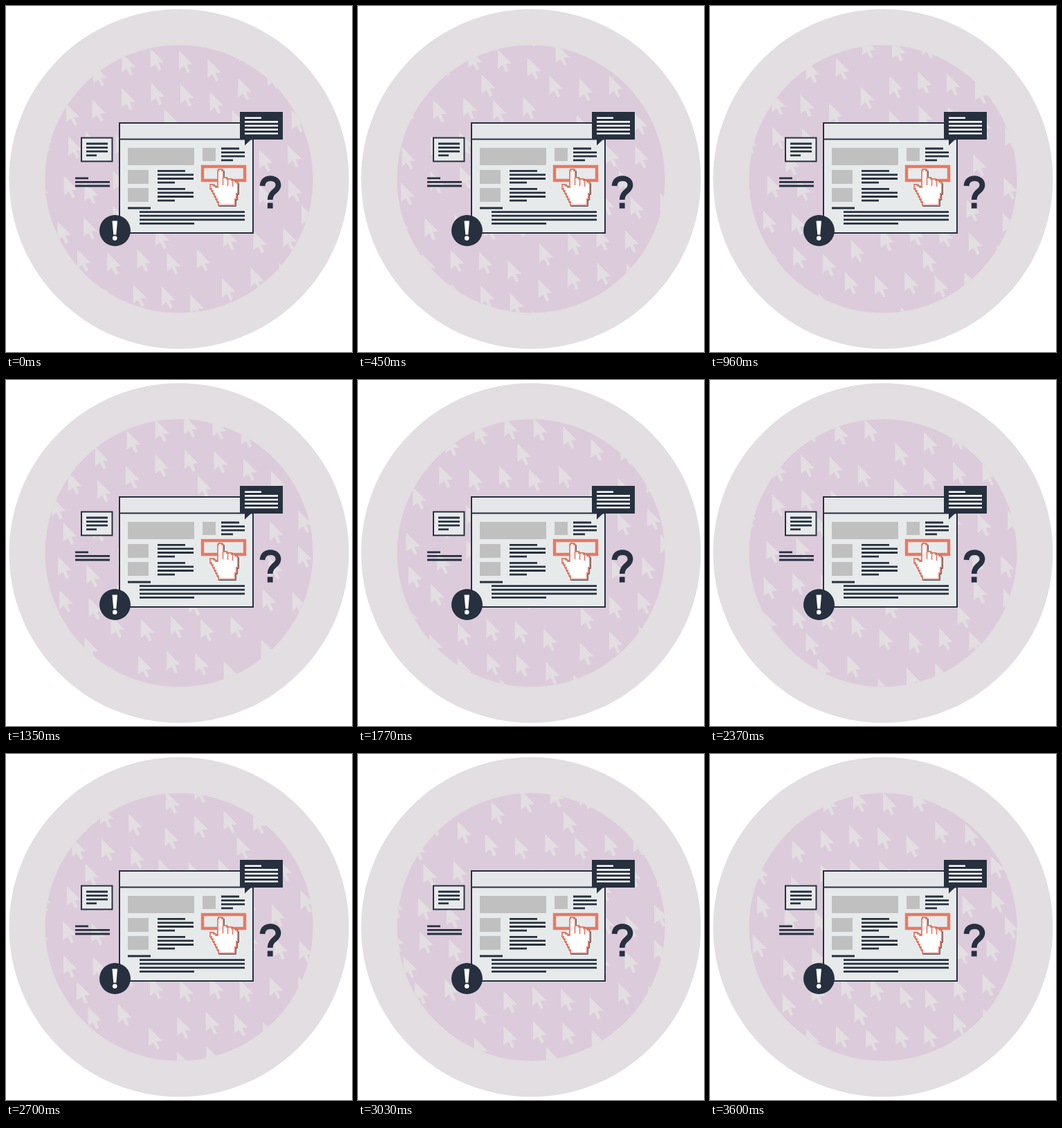
These frames come from a looping animation (500 by 500 pixels, 3.63 s). An HTML page:

```html
<!DOCTYPE html>
<html lang="en">
<head>
<meta charset="utf-8">
<title>Drifting cursors</title>
<style>
  html, body { margin: 0; width: 100%; height: 100%; overflow: hidden; background: #fff; }
  svg { display: block; width: 100vw; height: 100vh; }
</style>
</head>
<body>
<svg viewBox="0 0 500 500">
  <defs>
    <clipPath id="disc"><circle cx="250" cy="250" r="193.5"/></clipPath>
    <path id="hand" d="M307 236H312V238H314V248H319V250H326V252H331V254H334V256H335V271H333V279H331V288H307V283H305V279H303V275H301V271H299V267H297V264H295V258H300V260H303V262H306V238H307Z"/>
  </defs>
  <circle cx="250" cy="250" r="245.5" fill="#e2dee1"/>
  <circle cx="250" cy="250" r="193.5" fill="#dccbdb"/>
  <g clip-path="url(#disc)"><path id="arrows" fill="#e2dee1"/></g>

  <!-- browser window -->
  <rect x="164" y="169" width="193" height="159" fill="#e7eaeb" stroke="#26303f" stroke-width="2"/>
  <rect x="165" y="170" width="191" height="22" fill="#e5e6e9"/>
  <path d="M164 192.500H357" stroke="#26303f" stroke-width="2"/>
  <path d="M176 205h96v25h-96zM284 205h19v19h-19zM176 237h30v20h-30zM176 263h30v20h-30z" fill="#c0c0c1"/>

  <!-- note card, speech bubble, text strokes -->
  <rect x="109" y="190.500" width="44.500" height="34" fill="#e7eaeb" stroke="#26303f" stroke-width="2"/>
  <path d="M338 153H400V193H354L345 201.500V193H338Z" fill="#26303f"/>
  <path id="dark" stroke="#26303f" stroke-width="2.800"/>
  <path id="light" stroke="#fff" stroke-width="2.600"/>

  <!-- button and hand -->
  <rect x="284" y="232" width="61" height="20" fill="#e7eaeb" stroke="#ea7862" stroke-width="4.400"/>
  <use href="#hand" x="1" y="1" fill="#26303f" stroke="#26303f" stroke-width="1.400"/>
  <use href="#hand" fill="#fff" stroke="#ea7862" stroke-width="1.800"/>
  <path d="M313.500 248V259M320.500 251V260M327.500 253V261" stroke="#ea7862" stroke-width="1.700"/>

  <!-- exclamation and question signs -->
  <circle cx="157.500" cy="324.500" r="22.500" fill="#26303f"/>
  <path d="M153.500 310.500H161L159.300 330.500H155.300Z" fill="#fff"/>
  <circle cx="157.300" cy="335.600" r="3.300" fill="#fff"/>
  <path d="M370.500 260C371 252.500 376 249.200 382 249.200C388.500 249.200 393.500 253 393.500 259C393.500 268 381.700 267.500 381.700 280" fill="none" stroke="#26303f" stroke-width="7.800"/>
  <rect x="377.800" y="284.500" width="7.800" height="8" fill="#26303f"/>
</svg>
<script>
  const LOOP = 3630, STEP = 30, SPEED = 1 / 9;
  const $ = id => document.getElementById(id);

  // a paragraph of strokes; the first and last may be shorter
  function lines(x, y, count, width, first = width, last = width) {
    let d = "";
    for (let i = 0; i < count; i++) {
      const w = i === 0 ? first : i === count - 1 ? last : width;
      d += `M${x} ${y + i * 5.6}h${w}`;
    }
    return d;
  }
  $("dark").setAttribute("d",
    lines(311, 206, 4, 34, 26, 17) +
    lines(219, 238.3, 4, 52, 40, 25) +
    lines(219, 264.3, 4, 52, 40, 25) +
    lines(176, 292, 1, 33) +
    lines(193, 297.6, 4, 152, 152, 79) +
    lines(116, 199, 4, 31, 31, 15) +
    lines(100, 248.8, 3, 50, 19));
  $("light").setAttribute("d", lines(345, 161.8, 5, 48, 24));

  // three bands of five cursors, two of them sagging, plus a stray one
  function cluster(x, y) {
    const at = (dx, dy) => `M${x + dx} ${y + dy}v28l7-5.500 5 10 4-2-4.500-10 8.500-.5z`;
    let d = at(113, -33);
    for (let i = 0; i < 5; i++) {
      d += at(43.2 * i, i % 2 * 4.5 - 0.5);
      d += at(41.3 * i - 2, 50 + 4.6 * (i - 2.2) ** 2);
      d += at(42.5 * i + 9, -71 + 4.6 * (i - 2.3) ** 2);
    }
    return d;
  }

  // each column repeats its cluster downwards, leaning slightly left
  const columns = [[-89, 246], [103, 352], [314, 321], [533, 282], [738, 327]];
  let field = "";
  for (const [x, y] of columns)
    for (let row = -4; row < 6; row++)
      field += cluster(x - 12.5 * row, y + 170.3 * row);
  $("arrows").setAttribute("d", field);

  function draw(time) {
    const t = Math.floor((time % LOOP) / STEP) * STEP;
    const shift = -t * SPEED;
    $("arrows").setAttribute("transform", `translate(${shift} ${shift})`);
  }

  let start;
  function tick(now) {
    if (start === undefined) start = now;
    draw(Math.max(0, now - start));
    requestAnimationFrame(tick);
  }
  draw(0);
  requestAnimationFrame(tick);
</script>
</body>
</html>
```
